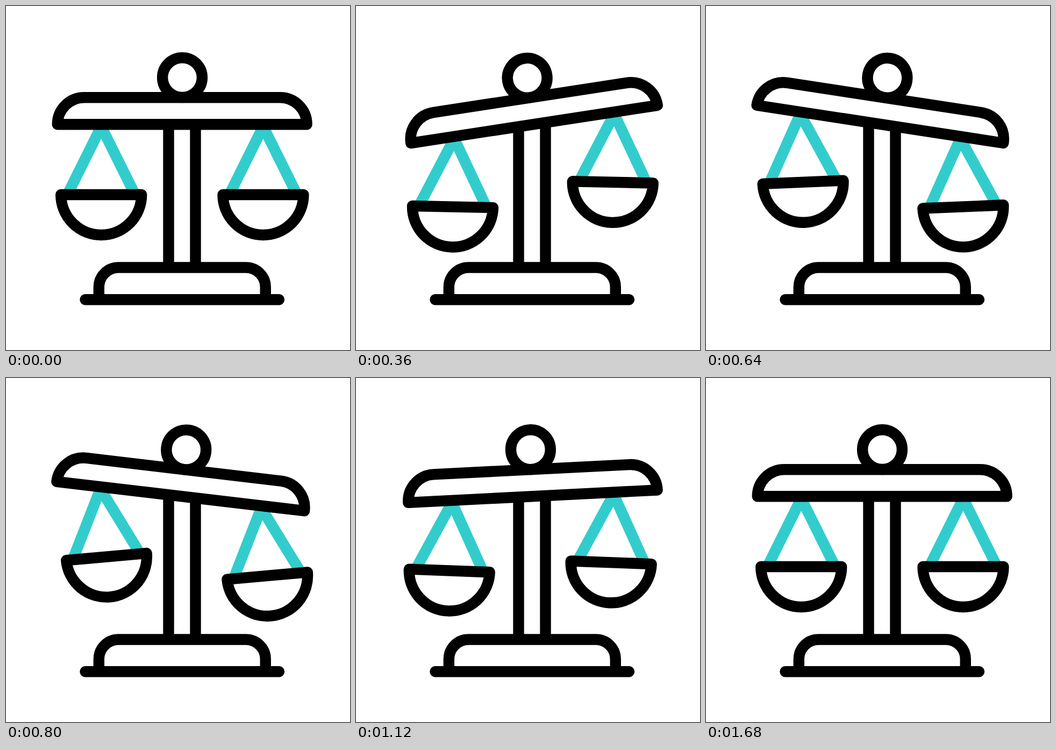
These frames come from a looping animation (640 by 640 pixels, 1.72 s). An HTML page:

```html
<!DOCTYPE html>
<html lang="en">
<head>
<meta charset="utf-8">
<title>Balance scales</title>
<style>
  html, body { margin: 0; width: 100%; height: 100%; overflow: hidden; background: #fff; }
  svg { display: block; width: 100%; height: 100%; }
  .ink { fill: none; stroke: #000; stroke-width: 20.4; stroke-linejoin: round; }
  .solid { fill: #fff; }
  .cord { fill: none; stroke: #33cccc; stroke-width: 20.4; stroke-linejoin: round; }
</style>
</head>
<body>
<svg viewBox="0 0 640 640">
  <defs>
    <!-- hanging pan, with its joint at 0,0 -->
    <g id="pan">
      <path class="cord" d="M-61.5 128 L0 4.2 L61.5 128"/>
      <path class="ink solid" d="M-75 131 H75 A75 75 0 0 1 -75 131 Z"/>
    </g>
  </defs>
  <path class="ink" d="M302.5 215 V487 M352.5 215 V487"/>
  <path class="ink" d="M172.8 546 V523 A36.5 36.5 0 0 1 209.3 486.5 H446.3 A36.5 36.5 0 0 1 482.8 523 V546"/>
  <path class="ink" stroke-linecap="round" d="M147.5 546.2 H508"/>
  <use class="hang" href="#pan"/>
  <use class="hang" href="#pan"/>
  <g id="beam">
    <path class="ink solid" d="M95.7 220.2 A49.7 50 0 0 1 145.4 170.2 H510 A49.7 50 0 0 1 559.7 220.2 Z"/>
    <circle class="ink" cx="328" cy="133.1" r="36.9"/>
  </g>
</svg>
<script>
  const LOOP = 1720, STEP = 40;
  const PIVOT = { x: 328, y: 195 };
  const JOINTS = [177.2, 478.5], JOINT_Y = 220;

  // [time in ms, clockwise angle in degrees]
  const BEAM = [[40, 0], [333, -9], [667, 9], [1130, -2.9], [1400, 0]];
  const SWING = [[40, 0], [430, 1.3], [815, -5.1], [1140, 2.2], [1410, -0.95], [1690, 0]];

  const beam = document.getElementById('beam');
  const pans = document.querySelectorAll('.hang');

  const ease = s => (1 - Math.cos(Math.PI * s)) / 2;

  function angleAt(keys, t) {
    if (t <= keys[0][0]) return keys[0][1];
    for (let i = 1; i < keys.length; i++) {
      const [t0, a] = keys[i - 1], [t1, b] = keys[i];
      if (t < t1) return a + (b - a) * ease((t - t0) / (t1 - t0));
    }
    return keys[keys.length - 1][1];
  }

  function draw(now) {
    const t = Math.floor((now % LOOP) / STEP) * STEP;
    const tilt = angleAt(BEAM, t), swing = angleAt(SWING, t);
    const rad = tilt * Math.PI / 180, c = Math.cos(rad), s = Math.sin(rad);
    beam.setAttribute('transform', `rotate(${tilt} ${PIVOT.x} ${PIVOT.y})`);
    pans.forEach((pan, i) => {
      const dx = JOINTS[i] - PIVOT.x, dy = JOINT_Y - PIVOT.y;
      const x = PIVOT.x + dx * c - dy * s, y = PIVOT.y + dx * s + dy * c;
      pan.setAttribute('transform', `translate(${x} ${y}) rotate(${swing})`);
    });
  }

  const start = performance.now();
  function loop() {
    draw(performance.now() - start);
    requestAnimationFrame(loop);
  }
  loop();
</script>
</body>
</html>
```
